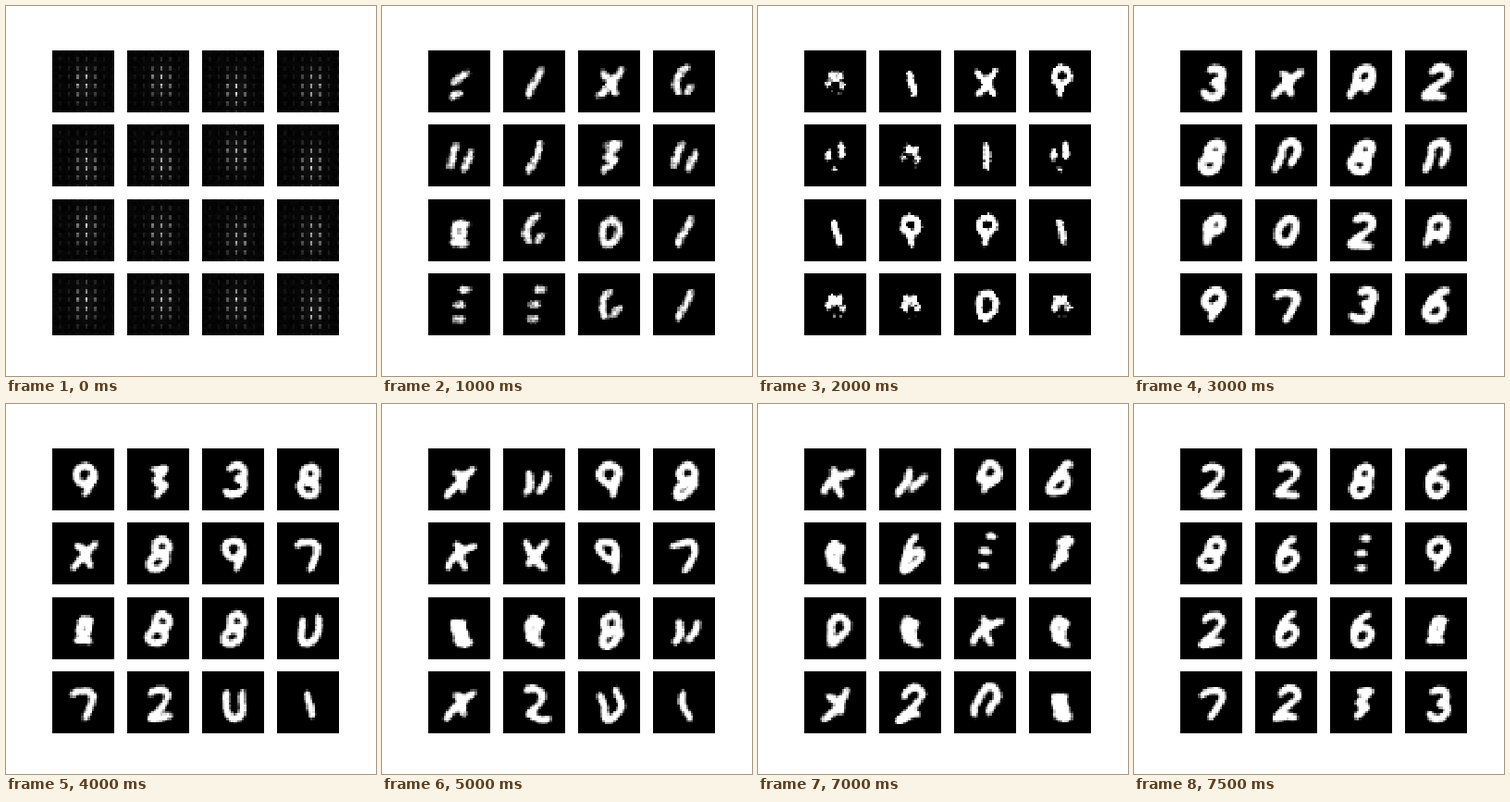
An HTML page with a canvas that plays this animation: 400x400 px, repeating every 8 s.

```html
<!DOCTYPE html>
<html lang="en">
<head>
<meta charset="utf-8">
<title>Generated digits</title>
<style>
  html, body { margin: 0; height: 100%; overflow: hidden; background: #fff; }
  canvas { display: block; }
</style>
</head>
<body>
<canvas id="stage" width="400" height="400"></canvas>
<script>
const SIZE = 28, STEP = 500, SLOTS = 16, TURN = 2 * Math.PI;
const ctx = document.getElementById('stage').getContext('2d');
const tile = document.createElement('canvas');
tile.width = tile.height = SIZE;
const tileCtx = tile.getContext('2d');
ctx.imageSmoothingEnabled = false;

const clamp = v => Math.max(0, Math.min(1, v));

// Repeatable noise in 0..1
function noise(a, b = 0) {
  const v = Math.sin(a * 12.9898 + b * 78.233) * 43758.5453;
  return v - Math.floor(v);
}

// Curves over t = 0..1 in a box from -1 to 1, y down; arcs are measured in turns
const line = (x0, y0, x1, y1) => t => [x0 + (x1 - x0) * t, y0 + (y1 - y0) * t];
const arc = (cx, cy, rx, ry, from = 0, to = 1) => t => {
  const a = (from + (to - from) * t) * TURN;
  return [cx + rx * Math.cos(a), cy + ry * Math.sin(a)];
};

const arch = [line(-.7, 1, -.6, -.3), arc(0, -.4, .7, .6, .5, 1), line(.7, -.4, .5, .7)];
const shapes = {
  two: [arc(0, -.5, .75, .5, .5, 1.1), line(.5, -.1, -.7, .9), line(-.9, 1, 1, .9)],
  three: [arc(.1, -.5, .7, .5, .55, 1.25), arc(.1, .45, .8, .55, .75, 1.45)],
  six: [arc(0, .4, .75, .6), arc(.6, .2, 1.3, 1.2, .5, .75)],
  seven: [arc(-.1, -.4, .9, .5, .5, 1), line(.8, -.4, 0, 1)],
  eight: [arc(.15, -.5, .6, .5), arc(-.1, .5, .75, .5)],
  nine: [arc(0, -.4, .75, .6), line(.75, -.3, .1, 1)],
  key: [arc(0, -.4, .65, .55), line(0, .1, 0, 1)],
  pee: [arc(.2, -.5, .6, .5), line(-.4, -.6, -.3, .9)],
  ring: [arc(0, 0, .7, .85)],
  cee: [arc(0, -.1, .7, .9, .75, .3), line(.8, .1, .3, .7)],
  cup: [line(-.6, -.9, -.7, .3), arc(0, .3, .7, .7, .5, 0), line(.7, .3, .7, -.9)],
  arch,
  aye: [...arch, line(-.6, .2, .7, .1)],
  chi: [line(-.8, -.8, 0, -.1), line(1, -.9, -.8, .9), line(0, 0, .7, .9)],
  zig: [line(-.6, -.8, .6, -.8), line(.6, -.8, -.4, 0), line(-.4, 0, .5, .3), line(.5, .3, -.3, 1)],
  slash: [line(.3, -1, -.3, 1)],
  bar: [line(-.15, -.9, .2, .9)],
  pair: [line(-.4, -.9, -.8, .8), line(.9, -.4, .4, .9)],
  dashes: [line(.5, -.7, -.7, 0), line(.4, .8, -.5, 1)],
  stack: [-1, 0, 1].map(y => line(-.4, y, .4, y - .15)),
  vee: [line(-.7, -.5, -.7, .2), line(.3, -.9, .4, .2), line(-.2, .9, .1, 1)],
  blob: [arc(0, 0, .4, .5), line(-.7, .8, .7, .8), line(-.5, -.6, .6, -.6)],
  scatter: Array.from({ length: 6 }, (_, i) => {
    const a = i / 6 * TURN, x = .75 * Math.cos(a), y = .85 * Math.sin(a);
    return line(x, y, x * .6, y * .6 + .3);
  })
};

// width: stroke half-width, soft: edge blur, rough: pixel grain, grid: lattice texture
const scenes = [
  { slot: 0 },
  { slot: 2, width: 1.7, soft: .9, rough: .35, grid: .12, slant: .25,
    names: 'dashes slash chi cee  pair slash zig pair  blob cee ring slash  stack stack cee slash' },
  { slot: 4, width: 1.6, soft: .35, rough: .4, grid: 0, slant: 0,
    names: 'scatter bar chi key  vee scatter bar vee  bar key key bar  scatter scatter ring scatter' },
  { slot: 6, width: 1.9, soft: .5, rough: .15, grid: 0, slant: .3,
    names: 'three chi aye two  eight arch eight arch  pee ring two aye  nine seven three six' },
  { slot: 8, width: 1.7, soft: .6, rough: .2, grid: 0, slant: .05,
    names: 'nine zig three eight  chi eight nine seven  blob eight eight cup  seven two cup bar' },
  { slot: 12, width: 1.8, soft: .6, rough: .2, grid: 0, slant: .15,
    names: 'chi pair nine aye  blob chi two zig  ring blob chi pair  chi chi arch blob' },
  { slot: 15, width: 1.7, soft: .55, rough: .15, grid: 0, slant: .15,
    names: 'two two eight six  eight six stack nine  two six six blob  seven two zig three' }
];
for (const scene of scenes) scene.names = scene.names?.split(/ +/);

// Place a shape in the tile with its slant and a slow seeded bend
function trace(curves, slant, bend, seed) {
  const phase = TURN * noise(seed, 1), samples = 24, dots = [];
  for (const curve of curves) {
    let last = null;
    for (let i = 0; i <= samples; i++) {
      const [u, v] = curve(i / samples);
      const x = 14 + 5.5 * (u - slant * v) + bend * Math.sin(2.5 * v + phase);
      const y = 14 + 6.7 * v + bend * Math.cos(2.5 * u + phase);
      if (last) dots.push({ x, y, length: Math.hypot(x - last.x, y - last.y) });
      last = { x, y };
    }
  }
  return dots;
}

const lattice = (x, y) => Math.cos((x - 3) * TURN / 4) + Math.cos((y - 3) * TURN / 4);

// Ink adds up along the strokes, so corners and small gaps fill in
function glyphShade(name, { width, soft, rough, grid, slant }, bend, seed) {
  const dots = trace(shapes[name], slant, bend, seed);
  return (x, y) => {
    let ink = 0;
    for (const d of dots) {
      ink += d.length * Math.exp(-((x - d.x) ** 2 + (y - d.y) ** 2) / width ** 2);
    }
    ink /= width * Math.sqrt(Math.PI);
    const grain = rough * (noise(seed + x * 3.1, y) - .5) + grid * lattice(x, y);
    return (ink + grain * Math.min(1, 3 * ink) - .42) / soft + .5 * Math.min(1, 3 * ink);
  };
}

function dotShade(seed) {
  const cx = 14 + 2 * noise(seed, 2), cy = 12 + 6 * noise(seed, 3);
  return (x, y) => {
    const dot = clamp(lattice(x, y - .4) - .75) * .8;
    const glow = Math.exp(-(((x - cx) / 5) ** 2) - ((y - cy) / 8) ** 2);
    const vary = .6 + .4 * noise(seed + (x >> 2), y >> 2);
    return dot * (glow * vary + .06) + .06 * glow + .03 * noise(seed + x, y);
  };
}

function paintTile(shade, col, row) {
  const image = tileCtx.createImageData(SIZE, SIZE);
  for (let i = 0; i < SIZE * SIZE; i++) {
    const v = 255 * clamp(shade(i % SIZE, Math.floor(i / SIZE)));
    image.data.set([v, v, v, 255], i * 4);
  }
  tileCtx.putImageData(image, 0, 0);
  ctx.drawImage(tile, 50 + 81 * col, 48 + Math.round(80.4 * row), 67, 67);
}

function drawSlot(slot) {
  const at = scenes.findLastIndex(s => s.slot <= slot);
  const between = scenes[at].slot !== slot;
  for (let cell = 0; cell < 16; cell++) {
    const seed = slot * 16 + cell + 1;
    const forward = between && (at === 0 || noise(seed, 5) > .5);
    const scene = scenes[at + (forward ? 1 : 0)];
    // Just after the dots the strokes are still faint and textured
    const style = at === 0 ? { ...scene, soft: 1.5, grid: .25 } : scene;
    const shade = scene.names
      ? glyphShade(scene.names[cell], style, between ? 1.5 : .5, seed)
      : dotShade(seed);
    paintTile(shade, cell % 4, cell >> 2);
  }
}

let shown = -1;
function frame() {
  const slot = Math.floor(performance.now() / STEP) % SLOTS;
  if (slot !== shown) drawSlot(shown = slot);
  requestAnimationFrame(frame);
}
frame();
</script>
</body>
</html>
```
